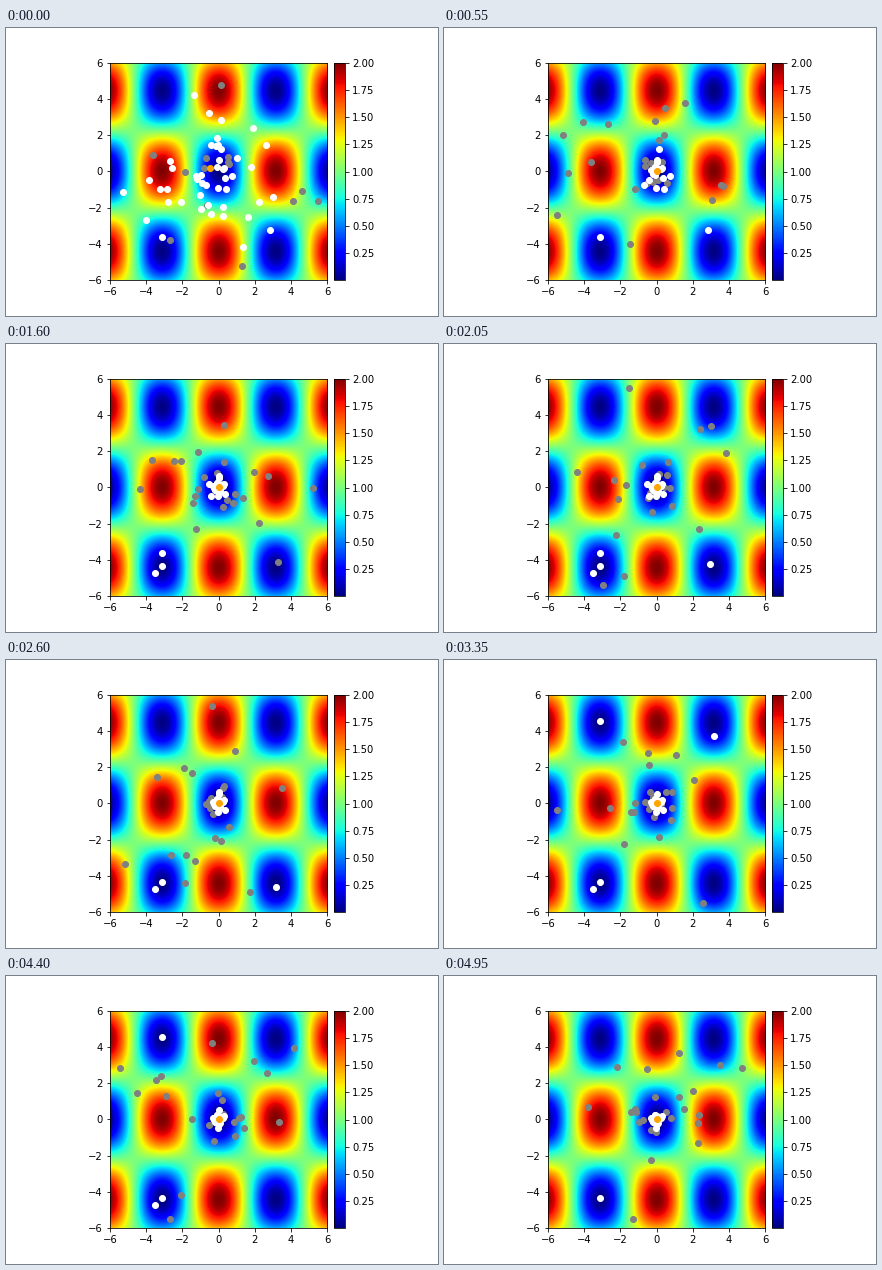
Animation, 432 px wide and 288 px high, one loop 5000 ms. Source, as a matplotlib script:

```python
import numpy as np
import matplotlib.pyplot as plt
from matplotlib.animation import FuncAnimation

W, H, DPI = 432, 288, 72
LEFT, BOTTOM, SIDE = 103.9, 36.0, 217.44
LIMIT = 6
FRAMES, INTERVAL = 100, 50


def griewank(x, y):
    return 1 + (x**2 + y**2) / 4000 - np.cos(x) * np.cos(y / np.sqrt(2))


def cloud(rng, spread, count):
    points = rng.normal(0, spread, (count, 2))
    return np.clip(points, -LIMIT + 0.5, LIMIT - 0.5)


# A wide first population, and a tight core that joins it one by one
rng = np.random.default_rng(7)
START = cloud(rng, 2.1, 44)
START_COST = griewank(*START.T)
CORE = cloud(rng, 0.24, 20)
CORE_COST = griewank(*CORE.T)
CORE_BORN = np.arange(len(CORE))

# Points resting in the outer minima: x, y, first step, last step
OUTER = np.array([
    (-3.13, -3.65, 0, 46), (-3.15, -4.36, 16, 99), (-3.50, -4.73, 30, 88),
    (2.97, -4.26, 37, 46), (3.17, -4.60, 48, 58), (-3.15, 4.52, 60, 90),
    (3.14, 3.70, 62, 72)])


def elite_points(k):
    """Keep what costs less than a falling limit."""
    level = 0.06 + 0.45 * np.exp(-k / 25) + 1.7 * np.exp(-k / 3)
    in_middle = np.abs(START).max(axis=1) < 2
    start = START[(START_COST < level) & (in_middle | (k < 12))]
    core = CORE[(CORE_COST < level) & (CORE_BORN <= k)]
    resting = (OUTER[:, 2] <= k) & (k <= OUTER[:, 3])
    return np.vstack([start, core, OUTER[resting, :2]])


def trial_points(k):
    """Fresh trials at every step, some near the best point, most far."""
    rng = np.random.default_rng(100 + k)
    count = min(24, 14 + k)
    near = count * 2 // 5
    return np.vstack([cloud(rng, 0.7, near), cloud(rng, 2.7, count - near)])


def best_point(k):
    return np.array([[-0.47, 0.2]]) * 0.4**k


fig = plt.figure(figsize=(W / DPI, H / DPI), dpi=DPI, facecolor="white")
ax = fig.add_axes([LEFT / W, BOTTOM / H, SIDE / W, SIDE / H])
cax = fig.add_axes([328.4 / W, BOTTOM / H, SIDE / 20 / W, SIDE / H])

axis = np.linspace(-LIMIT, LIMIT, 218)
field = ax.imshow(griewank(*np.meshgrid(axis, axis)), cmap="jet",
                  extent=[-LIMIT, LIMIT, -LIMIT, LIMIT], origin="lower",
                  interpolation="bilinear", aspect="auto")
ax.set(xlim=(-LIMIT, LIMIT), ylim=(-LIMIT, LIMIT),
       xticks=range(-6, 7, 2), yticks=range(-6, 7, 2))
fig.colorbar(field, cax=cax, ticks=np.arange(0.25, 2.01, 0.25), format="%.2f")


def dots(color, z):
    return ax.scatter([], [], s=36, color=color, linewidths=1, zorder=z)


trials, elite, best = dots("gray", 2), dots("white", 3), dots("orange", 4)


def draw(k):
    trials.set_offsets(trial_points(k))
    elite.set_offsets(elite_points(k))
    best.set_offsets(best_point(k))
    return trials, elite, best


anim = FuncAnimation(fig, draw, frames=FRAMES, interval=INTERVAL,
                     repeat=True, repeat_delay=0, blit=False)
plt.show()
```
